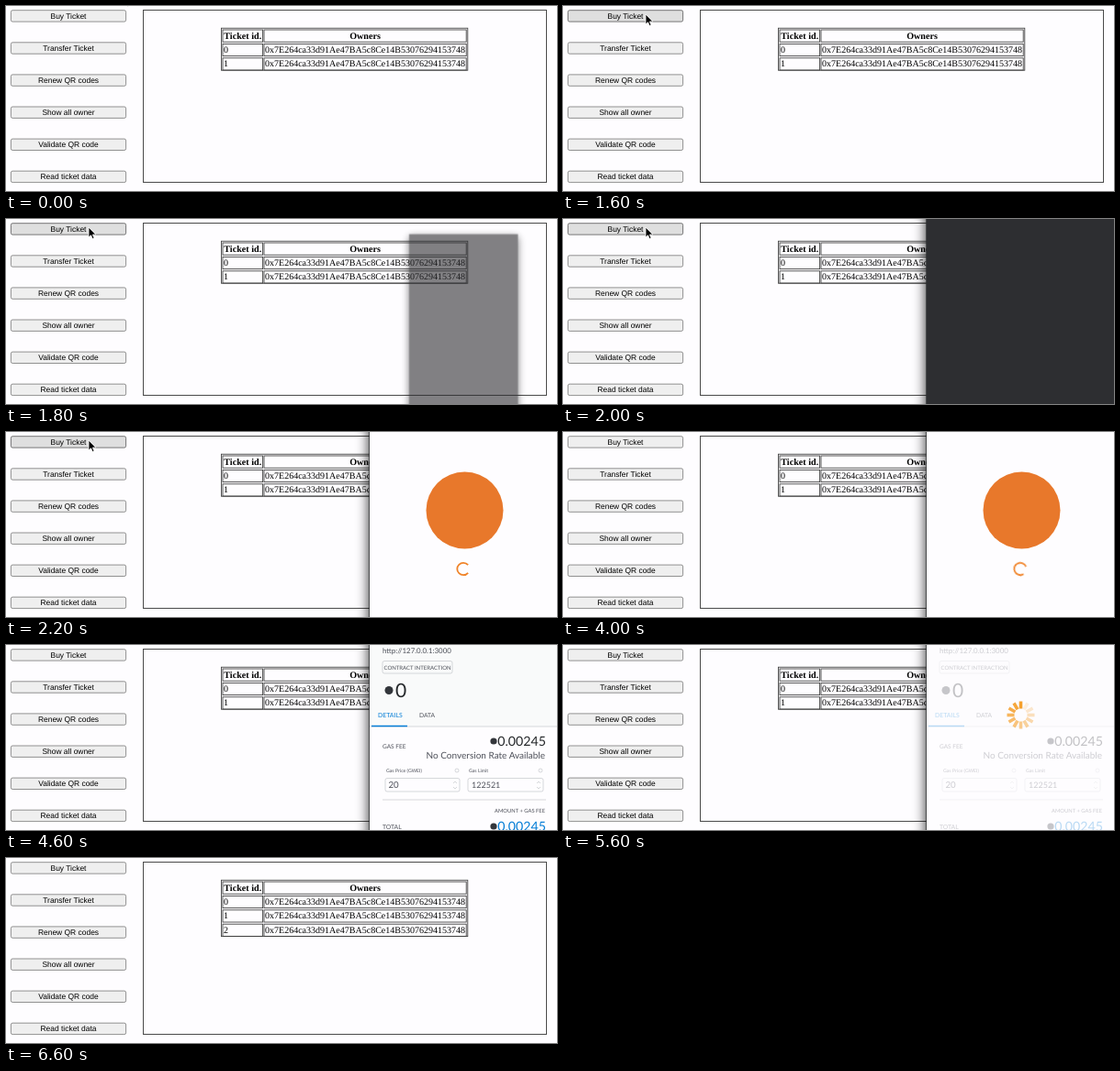
An HTML page that plays this animation: 600x202 px, repeating every 9400 ms.

```html
<!DOCTYPE html>
<html lang="en">
<head>
<meta charset="utf-8">
<title>Ticket shop</title>
<style>
  html, body { margin: 0; width: 100%; height: 100%; overflow: hidden; background: #fefdff; }
  svg { display: block; width: 100vw; height: 100vh; }
  text { text-rendering: geometricPrecision; }

  .timed { animation: 9.4s step-end -2ms infinite; }
  .button rect { fill: #efefef; stroke: #767676; stroke-width: .8; }
  .button text { font: 8.45px Arial, "Liberation Sans", sans-serif; text-anchor: middle; }
  .panel { fill: none; stroke: #4a4a4a; }
  .table rect { fill: none; stroke: #3c3c3c; stroke-width: .85; }
  .table text { font: 10.03px "Times New Roman", "Liberation Serif", serif; }
  .table .head { font-size: 10.15px; font-weight: bold; }
  .middle { text-anchor: middle; }
  .end { text-anchor: end; }

  #buy { animation-name: press; }
  #pointer { animation-name: point; }
  #frame { animation-name: grow; }
  #newRow { animation-name: added; }
  #popup { animation-name: open; transform-origin: 498px 124px; }
  #splash { animation-name: splash; }
  #page { animation-name: page; }
  #busy { animation-name: busy; }
  .waiting { animation-name: waiting; }
  .early { animation-name: early; }
  .late { animation-name: late; }
  .window { filter: drop-shadow(0 5px 7px rgba(0, 0, 0, .85)); }
  .spin { animation: spin 9.4s steps(47) -2ms infinite; }
  #ring { --from: -182deg; --to: 3672deg; transform-origin: 498px 149.5px; }
  #petals { --from: -240deg; --to: 2580deg; transform-origin: 498.5px 76.5px; }

  #page text { font-family: Lato, "Open Sans", sans-serif; fill: #4d5059; }
  #page .strong { fill: #24272a; }
  #page .blue { fill: #037dd6; }
  .line { fill: none; stroke: #c4c8cc; stroke-width: .7; }

  @keyframes press {
    0% { fill: #efefef; stroke: #767676; }
    2.128% { fill: #dfdfdf; stroke: #555; }
    14.894% { fill: #f5f5f5; stroke: #8d8d8d; }
    17.021% { fill: #dfdfdf; stroke: #555; }
    25.532%, 100% { fill: #efefef; stroke: #767676; }
  }
  @keyframes point {
    0% { transform: translate(128px, -12px); opacity: 1; }
    2.128% { transform: translate(86px, 13px); }
    4.255% { transform: translate(90px, 10px); }
    6.383% { transform: translate(90px, 9px); opacity: 1; }
    25.532%, 100% { transform: translate(90px, 9px); opacity: 0; }
  }
  @keyframes grow { 0% { height: 46px; } 70.213%, 100% { height: 61.4px; } }
  @keyframes added { 0% { opacity: 0; } 70.213%, 100% { opacity: 1; } }
  @keyframes open {
    0% { opacity: 0; transform: scale(.575); }
    19.149% { opacity: .6; transform: scale(.575); }
    21.277% { opacity: 1; transform: none; }
    63.83%, 100% { opacity: 0; transform: none; }
  }
  @keyframes splash { 0% { opacity: 0; } 23.404%, 100% { opacity: 1; } }
  @keyframes page { 0% { opacity: 0; } 44.681%, 100% { opacity: 1; } }
  @keyframes waiting { 0% { opacity: 1; } 46.809%, 100% { opacity: 0; } }
  @keyframes early { 0% { opacity: 0; } 46.809%, 100% { opacity: 1; } }
  @keyframes late { 0% { opacity: 0; } 48.936%, 100% { opacity: 1; } }
  @keyframes busy { 0% { opacity: 0; } 59.574%, 100% { opacity: 1; } }
  @keyframes spin { from { transform: rotate(var(--from)); } to { transform: rotate(var(--to)); } }
</style>
</head>
<body>
<svg viewBox="0 0 600 202">
  <g id="buttons"></g>
  <rect class="panel" x="149.5" y="4.5" width="439" height="188"/>

  <g class="table">
    <rect id="frame" class="timed" x="234.5" y="24.2" width="268.3" height="46"/>
    <g id="rows"></g>
    <g id="newRow" class="timed"></g>
  </g>

  <g id="popup" class="timed">
    <rect class="window" x="395.3" y="-63" width="206" height="375" fill="#2d2e31"/>

    <g id="splash" class="timed">
      <rect x="396" y="-63" width="206" height="375" fill="#fefdff"/>
      <circle cx="499.5" cy="85.5" r="42" fill="#e8782b"/>
      <circle id="ring" class="spin" cx="498" cy="149.5" r="6.7" fill="none" stroke="#f0842a"
              stroke-width="1.8" pathLength="360" stroke-dasharray="280 80" stroke-dashoffset="-40"/>
    </g>

    <g id="page" class="timed">
      <rect x="396" y="-63" width="206" height="375" fill="#fefdff"/>
      <rect x="396" y="-63" width="206" height="152" fill="#f9fafa"/>
      <text x="410" y="8.5" font-size="7.9">http://127.0.0.1:3000</text>
      <rect class="line" x="410" y="17.5" width="76" height="13.5" rx="2"/>
      <text x="448" y="26.8" font-size="6" class="middle">CONTRACT INTERACTION</text>
      <circle cx="417" cy="49.5" r="4.5" fill="#33363b"/>
      <text x="424" y="56.5" font-size="21" class="strong">0</text>

      <text x="405" y="79.3" font-size="6.9" class="blue">DETAILS</text>
      <text x="450" y="79.3" font-size="6.7">DATA</text>
      <path class="line" d="M396 89H601M410 169H588"/>
      <path d="M398 88.5h39" stroke="#037dd6" stroke-width="1.4"/>

      <text x="410" y="113" font-size="6.5">GAS FEE</text>
      <circle cx="531" cy="105" r="3.6" fill="#33363b"/>
      <text x="588" y="110" font-size="14.2" class="strong end timed waiting">0</text>
      <text x="588" y="110" font-size="14.2" class="strong end timed early">0.00245</text>
      <text x="587" y="124" font-size="10" class="end">No Conversion Rate Available</text>

      <text x="414" y="139" font-size="5.2">Gas Price (GWEI)</text>
      <text x="504" y="139" font-size="5.2">Gas Limit</text>
      <g class="line">
        <circle cx="491" cy="137" r="2"/><circle cx="582" cy="137" r="2"/>
        <rect x="413" y="145.5" width="81" height="14.5" rx="2"/>
        <rect x="503" y="145.5" width="82" height="14.5" rx="2"/>
        <path d="M487 151l2-2 2 2M487 155l2 2 2-2M578 151l2-2 2 2M578 155l2 2 2-2"/>
      </g>
      <text x="416.5" y="156.3" font-size="9.7" class="timed early">20</text>
      <text x="507" y="156.3" font-size="9" class="timed late">122521</text>

      <text x="587" y="183" font-size="5.8" class="end">AMOUNT + GAS FEE</text>
      <text x="410" y="200.5" font-size="6.8">TOTAL</text>
      <circle cx="531" cy="198" r="3.6" fill="#33363b"/>
      <text x="588" y="203" font-size="14.2" class="blue end timed late">0.00245</text>

      <g id="busy" class="timed">
        <rect x="396" y="-63" width="206" height="375" fill="#fefdff" fill-opacity=".73"/>
        <g id="petals" class="spin" stroke="#f5a02c" stroke-width="3.6"></g>
      </g>
    </g>
  </g>

  <path id="pointer" class="timed" d="M0 0V11L2.5 8.7 4.2 12.6 6 11.8 4.4 8H7.8Z"
        stroke="#fff" stroke-width=".8"/>
</svg>
<script>
  const byId = id => document.getElementById(id);
  const labels = ['Buy Ticket', 'Transfer Ticket', 'Renew QR codes',
    'Show all owner', 'Validate QR code', 'Read ticket data'];
  const owner = '0x7E264ca33d91Ae47BA5c8Ce14B53076294153748';

  byId('buttons').innerHTML = labels.map((label, i) => {
    const y = 4.7 + i * 35.1;
    const attrs = i ? '' : 'id="buy" class="timed"';
    return `<g class="button"><rect ${attrs} x="5.4" y="${y}" width="125.2" height="12.4" rx="1.8"/>
      <text x="68" y="${y + 9.2}">${label}</text></g>`;
  }).join('');

  function tableRow(index, cells) {
    const y = 26 + index * 15.4;
    return `<rect x="236" y="${y}" width="43.6" height="13.2"/>
      <rect x="281" y="${y}" width="220.2" height="13.2"/>${cells(y)}`;
  }
  const ticketRow = id => tableRow(id + 1, y =>
    `<text x="237" y="${y + 9.3}">${id}</text><text x="282" y="${y + 9.3}">${owner}</text>`);
  const headRow = tableRow(0, y =>
    `<text class="head" x="237.3" y="${y + 10.1}">Ticket id.</text>
     <text class="head middle" x="391" y="${y + 10.1}">Owners</text>`);

  byId('rows').innerHTML = headRow + ticketRow(0) + ticketRow(1);
  byId('newRow').innerHTML = ticketRow(2);

  byId('petals').innerHTML = Array.from({ length: 12 }, (_, i) =>
    `<path d="M498.5 69.5v-8" opacity="${1 - i / 13}" transform="rotate(${-30 * i} 498.5 76.5)"/>`).join('');
</script>
</body>
</html>
```
